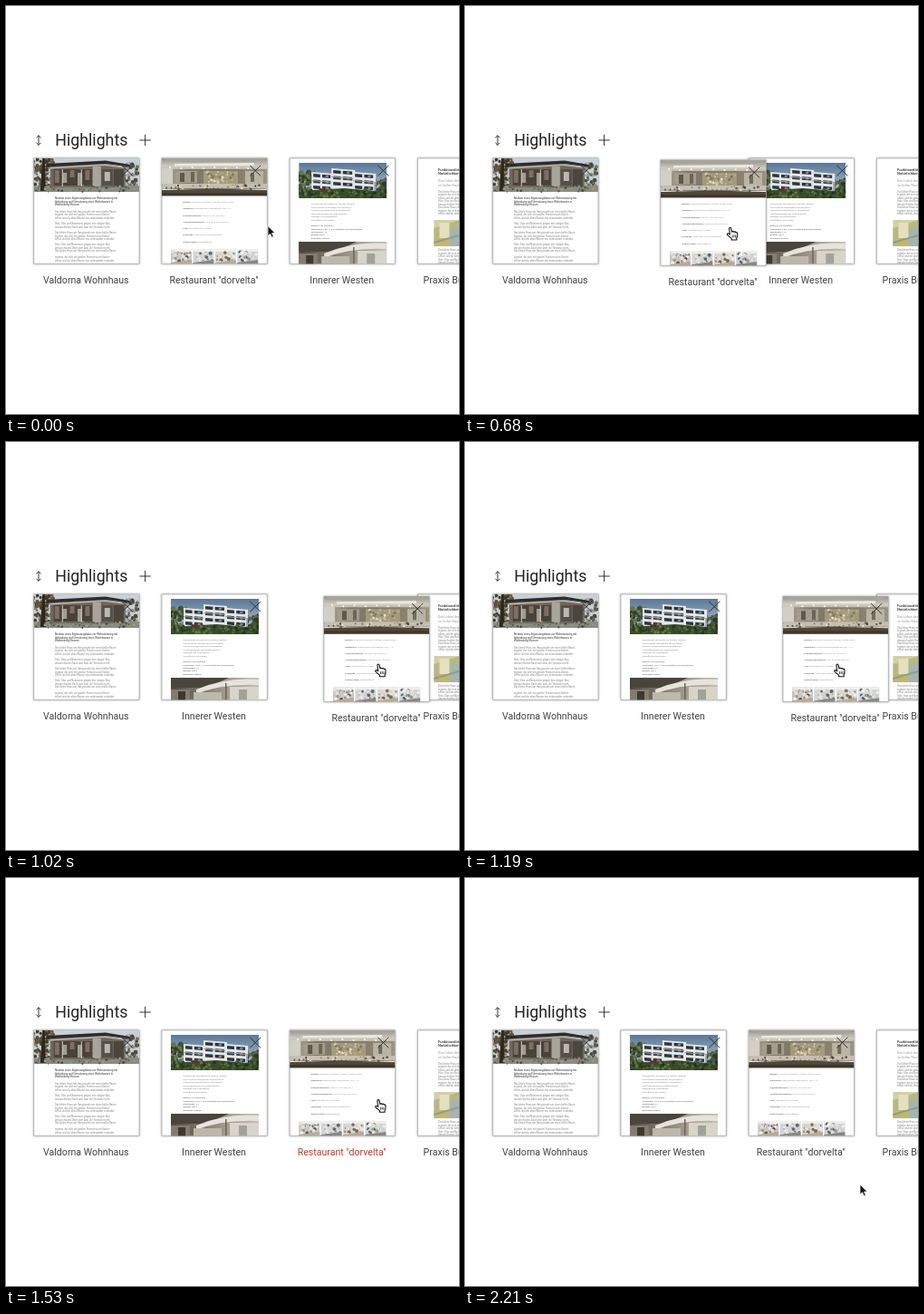
An HTML page for the animation above (2380 ms loop, 500 by 450 pixels).

```html
<!DOCTYPE html>
<html lang="de">
<head>
<meta charset="utf-8">
<title>Highlights</title>
<style>
  html, body { margin: 0; width: 100%; height: 100%; overflow: hidden; background: #fff; }
  svg { display: block; width: 500px; height: 450px; font-family: Roboto, Arial, sans-serif; }
  .paper { fill: #fff; stroke: #b0b0b0; stroke-width: .8; filter: drop-shadow(0 .5px 1px rgba(0,0,0,.4)); }
  .raised .paper { filter: drop-shadow(0 3px 3px rgba(0,0,0,.45)); }
  .label { font-size: 10.6px; fill: #404040; }
  .hot .label { fill: #c2392f; }
  .line { fill: none; stroke: #333; stroke-width: 1; }
</style>
</head>
<body>
<svg viewBox="0 0 500 450">
  <defs>
    <clipPath id="page"><rect width="116.2" height="116.2"/></clipPath>
    <clipPath id="shot"><rect x="10" y="5" width="97" height="39"/></clipPath>
    <linearGradient id="sky" x2="0" y2="1"><stop stop-color="#5b7897"/><stop offset="1" stop-color="#c3d0da"/></linearGradient>
    <linearGradient id="ceiling" x2="0" y2="1"><stop stop-color="#96938b"/><stop offset=".6" stop-color="#cfccc2"/><stop offset="1" stop-color="#aaa596"/></linearGradient>
    <linearGradient id="wall"><stop stop-color="#b3aea2"/><stop offset=".25" stop-color="#7f786a"/><stop offset=".7" stop-color="#857d69"/><stop offset="1" stop-color="#9a9482"/></linearGradient>
    <linearGradient id="room"><stop stop-color="#4e493f"/><stop offset=".5" stop-color="#958c7e"/><stop offset="1" stop-color="#c5c0b5"/></linearGradient>
  </defs>
  <path class="line" d="M36 142.8V153.4M33.4 145.4L36 142.8L38.6 145.4M33.4 150.8L36 153.4L38.6 150.8"/>
  <text x="54.3" y="154.3" font-size="17.75" fill="#222">Highlights</text>
  <path class="line" d="M147.4 148H159.8M153.6 141.8V154.2"/>
  <g id="cards"></g>
  <g id="arrow"><path d="M0 0V11.2L2.6 8.8L4.4 12.7L6.3 11.9L4.6 8.1H8.1Z" fill="#111" stroke="#fff" stroke-width=".8"/></g>
  <g id="hand">
    <path d="M3.4 8L2.6 1.6C2.5 0 4.5 -.2 4.8 1.4L5.6 5.2C6 4.2 7.5 4.2 7.8 5.4C8.3 4.5 9.7 4.7 9.9 5.9C10.5 5.3 11.6 5.6 11.7 6.8C12 9 11.7 10.6 10.8 12V14H5.2V12.4L.7 8.7C-.2 7.6 1.1 6.5 2.1 7.1Z" fill="#fff" stroke="#111" stroke-width="1.1" stroke-linejoin="round"/>
    <path d="M6.2 8.4V11.4M7.9 8.4V11.4M9.5 8.4V11.4" stroke="#111" stroke-width=".7"/>
  </g>
</svg>
<script>
const $ = id => document.getElementById(id);

function rng(seed) {
  return () => (seed = (seed * 16807) % 2147483647) / 2147483647;
}
const box = (x, y, w, h, fill) => `<rect x="${x}" y="${y}" width="${w}" height="${h}" fill="${fill}"/>`;
const shape = (d, fill) => `<path d="${d}" fill="${fill}"/>`;
const type = (x, y, str, size = 2.7, fill = '#777', weight = 400) =>
  `<text x="${x}" y="${y}" font-size="${size}" fill="${fill}" font-weight="${weight}">${str}</text>`;

function leaves(n, x, y, w, h, colors, seed, size = 1.5) {
  const rand = rng(seed * 7919);
  let out = '';
  for (let i = 0; i < n; i++) {
    const cx = x + w * rand(), cy = y + h * rand(), r = size * (.4 + rand());
    out += `<circle cx="${cx.toFixed(1)}" cy="${cy.toFixed(1)}" r="${r.toFixed(1)}" fill="${colors[i % colors.length]}"/>`;
  }
  return out;
}

const filler = [
  'Das kleine Haus am Hang wurde um einen hellen Raum',
  'ergänzt, der sich mit großen Fenstern zum Garten',
  'öffnet und die alten Räume neu miteinander verbindet.',
  'Holz, Glas und Naturstein prägen den ruhigen Bau,',
  'dessen flaches Dach weit über die Terrasse reicht.'
];
const prose = (x, rows, size = 2.75) =>
  rows.map((y, i) => type(x, y, filler[i % filler.length], size, '#808080')).join('');

function housePhoto() {
  let s = box(0, 0, 116.2, 37, '#c6d0d8');
  s += leaves(130, -2, 0, 24, 32, ['#3f3a2c', '#6b5a40', '#51472f', '#8d8068'], 11, 1.7);
  s += leaves(60, 97, 5, 20, 25, ['#4a4838', '#777264', '#5e5a47', '#9aa0a0'], 29, 1.7);
  s += box(0, 30, 116.2, 7, '#8a8c80');
  s += shape('M18 9L78 6L101 10V32H18Z', '#70675c');
  s += box(22, 12, 42, 18, '#48423b');
  for (let i = 0; i < 5; i++) s += box(23 + i * 8.4, 13 + i % 2 * 3, 5, 14 - i % 3 * 3, i % 2 ? '#a39d91' : '#7e6f60');
  s += box(65, 9, 9, 22, '#a9a59c') + box(75, 12, 12, 18, '#54504a') + box(78, 15, 6, 10, '#bcb9ad');
  s += box(88, 12, 11, 19, '#4a453e') + box(31, 12, 1, 19, '#d0ccc2') + box(52, 12, 1, 19, '#d0ccc2');
  s += shape('M14 6L79 2.5L106 7V9.5L79 6L14 9.5Z', '#2e2d2b') + shape('M18 10L78 6.5L101 10V11L78 8L18 11.5Z', '#c0bbb0');
  s += shape('M7 36L9.5 0H12L13 36Z', '#2f281e');
  return s + leaves(70, 0, 30, 116, 7, ['#565e49', '#9b9c8e', '#484b3e', '#787b6c'], 7, 1.1);
}

function diningPhoto() {
  let s = box(0, 0, 116.2, 15, 'url(#ceiling)') + box(0, 12, 116.2, 22, 'url(#wall)');
  s += shape('M0 0H116.2L104 4H14Z', '#a7a49b') + shape('M14 6L102 5V8L14 8.5Z', '#ece9df');
  for (let i = 0; i < 9; i++) s += `<circle cx="${9 + i * 12.3}" cy="${10 + i % 2}" r="1" fill="#fffbe6"/>`;
  s += box(0, 11, 12, 20, '#d3cfc4') + box(15, 14, 24, 13, '#a59d8c') + box(92, 14, 20, 14, '#bab4a4');
  s += box(20, 16, 5, 10, '#5f584c') + box(32, 15, 4, 11, '#6c6557') + box(98, 16, 4, 10, '#716a5d');
  s += box(46, 14, 38, 15, '#a39a7c');
  s += leaves(45, 49, 15, 33, 12, ['#cfc8a2', '#b5ab82', '#e6e0c4', '#7d755b'], 17, 1.2);
  s += box(0, 28, 116.2, 5, '#c4bfb2') + leaves(40, 0, 29, 116, 5, ['#4b443a', '#958c7b', '#dcd7ca', '#6a6253'], 23, 1.1);
  return s + shape('M0 35L58 33.5L116.2 35V41.3H0Z', '#51483b') + box(0, 38, 116.2, 3.3, '#3f372c');
}

function villaPhoto() {
  let s = box(10, 5, 97, 39, 'url(#sky)');
  s += leaves(80, 8, 15, 20, 24, ['#2c3c26', '#435532', '#66754d'], 41, 2);
  s += leaves(40, 92, 23, 16, 15, ['#2d3a28', '#465638', '#5c6b4a'], 61, 2);
  // Stepped blocks: each is white slabs over dark glazing, falling to the right
  [[24, 15, 24], [46, 11, 26], [70, 15, 25]].forEach(([x, y, w]) => {
    s += shape(`M${x} ${y}L${x + w} ${y + 2}V37H${x}Z`, '#e4e7e8');
    for (let i = 0; i < 3; i++) {
      const top = y + 2 + i * 6.5;
      s += shape(`M${x + 2} ${top}L${x + w - 3} ${top + 1.6}V${top + 5}L${x + 2} ${top + 3.6}Z`, '#30363c');
      s += box(x + w * .4, top, 2.2, 6, '#e4e7e8') + box(x + w * .65, top + 1.6, 3, 2.4, '#7c868d');
    }
    s += shape(`M${x} ${y + 9}L${x + w} ${y + 11}V37H${x + w - 2}V${y + 12}L${x} ${y + 10}Z`, '#9fa6a9');
  });
  s += shape('M10 36L60 33L107 37V44H10Z', '#3a4c2b');
  s += leaves(110, 10, 34, 97, 9, ['#24331f', '#455e33', '#5f7748', '#304024'], 83, 1.5);
  s += leaves(7, 34, 31, 10, 6, ['#7d2f33'], 5, 1);
  return `<g clip-path="url(#shot)">${s}</g>`;
}

function roomPhoto() {
  let s = box(10, 92, 97, 25, 'url(#room)');
  s += shape('M10 92H74L49 103H10Z', '#4a453c') + shape('M38 105Q70 91 107 94V100Q67 98 38 110Z', '#e6e3dc');
  s += box(10, 105, 21, 12, '#857c6e') + box(35, 108, 31, 9, '#bdb8ac') + box(75, 102, 32, 15, '#d8d4c9');
  return s + box(70, 98, 1.5, 19, '#6b6459') + box(85, 105, 9, 12, '#a1a39b') + box(18, 107, 8, 10, '#3d3932');
}

function thumb(i) {
  const x = 10 + i * 24.4;
  const wall = ['#c9c6c0', '#d3d4d5', '#d8d6ce', '#cbd2d6'][i];
  const dark = ['#5a5550', '#5c6672', '#7c6b5c', '#566069'][i];
  return box(x, 100, 23, 17, wall) + box(x, 100, 23, 3, '#efeeeb') +
    leaves(26, x + 1.5, 103, 20, 13, [dark, '#f1f0ed', '#9c9790', '#e3e1db'], 31 + i, 1.5) +
    shape(`M${x} 115L${x + 23} 112V117H${x}Z`, i % 2 ? '#8a8681' : '#b7aa9a');
}

function housePage() {
  return housePhoto() +
    ['Neubau eines Ergänzungsbaus zur Wohnnutzung mit', 'Anbindung und Umnutzung eines Wohnhauses in', 'Waldenberg/Hessen']
      .map((s, i) => type(23.2, 45 + i * 3.7, s, 2.95, '#555', 500)).join('') +
    prose(23.2, [59.5, 63, 66.5, 73, 76.5, 83, 86.5, 90, 96, 99.5, 103, 110, 113.5]);
}

function diningPage() {
  const facts = [
    ['Bauherr:', 'Nordlicht Gastraum, Altstadt, Untere Gasse'],
    ['Objektform:', 'Gastronomie Innenausbau, LPH 1–9'],
    ['Planungszeitraum:', 'Mai 2011 bis Juni 2012'],
    ['Ausführungszeitraum:', 'April 2012 bis Juli 2012'],
    ['Lage:', 'Dachgeschoss Altstadt'],
    ['Fotografie:', 'Innenraum und Dachterrasse'],
    ['Weitere Daten:', 'Gesamtfläche']
  ];
  return diningPhoto() + facts.map(([k, v], i) =>
    type(23.3, 49.1 + i * 7.25, `<tspan font-weight="500" fill="#555">${k}</tspan> ${v}`, 2.45, '#8a8a8a')).join('') +
    [0, 1, 2, 3].map(thumb).join('');
}

function villaPage() {
  const top = ['Wohnanlage mit Gärten im Westen, Neubau', 'und moderne Stadthäuser mit Terrassen',
    'Planung und Bauleitung im Stadtgebiet', 'Leistungsphasen der Objektplanung', 'Gebäude und Innenräume', 'Wohnfläche und Garten'];
  const facts = ['Bauherr: HR Wohnbau', 'Leistungen: LPH 1–8 Architektur und Innenausbau',
    'Wohnungen: 12', 'Bauzeit: 2012', 'Bauweise: massiv'];
  return villaPhoto() + top.map((s, i) => type(23.5, 51 + i * 3.55, s, 2.5)).join('') +
    facts.map((s, i) => type(23.5, 75.3 + i * 3.3, s, 2.5, '#666', 500)).join('') + roomPhoto();
}

function praxisPage() {
  let s = type(22.7, 13.6, 'Funktionalität', 4.1, '#444', 700) + type(22.7, 18.2, 'Natürlichkeit und', 4.1, '#444', 700);
  s += type(22.7, 26.3, 'Das Leben der Menschen', 3.6, '#999') + type(22.7, 30.5, 'im hellen Raum', 3.6, '#999');
  s += prose(22.7, [37.5, 41, 44.5, 48, 51.5, 55, 58.5, 62]);
  s += box(18, 68, 80, 29, '#d3cfa4') + shape('M18 77L46 68V97H18Z', '#b7b884');
  s += box(24, 71, 11, 17, '#e4e0c0') + box(36, 77, 10, 20, '#a4b5b2') + box(20, 88, 14, 7, '#c4b567');
  s += shape('M18 92L46 84V86L18 94Z', '#8d9b91');
  return s + prose(22.7, [102, 105.5, 109, 112.5, 116]);
}

const slot = i => 30.8 + i * 141.2;
const pages = [
  ['Valdorna Wohnhaus', housePage()],
  ['Innerer Westen', villaPage()],
  ['Praxis Bunthalden', praxisPage()],
  ['Restaurant "dorvelta"', diningPage()]
];
$('cards').innerHTML = pages.map(([name, art], i) => `<g id="card${i}">
  <rect class="paper" width="116.2" height="116.2"/>
  <g clip-path="url(#page)">${art}</g>
  <path class="line" d="M97.2 7.8L109.2 19.4M109.2 7.8L97.2 19.4"/>
  <text class="label" ${i === 2 ? 'x="6.2"' : 'x="57.5" text-anchor="middle"'} y="137.6">${name}</text></g>`).join('');

const place = (id, x, y) => $(id).setAttribute('transform', `translate(${x} ${y})`);
place('card0', slot(0), 168);
place('card2', slot(3), 168);

// Pose per tick: card x, card lift, pointer x, pointer y
const TICK = 170;
const poses = [
  [slot(1), 0, 289, 242.5], [slot(1), 0, 258, 242], [slot(1), 0, 234, 242], [slot(1), 0, 231, 242],
  [216, 2, 289, 244], [303, 2.3, 375.3, 244.7], [351, 2.3, 407.3, 244.7], [351, 2.3, 407.3, 244.7],
  [322, 0, 407.3, 244.3], [slot(2), 0, 407.3, 244.3], [slot(2), 0, 408, 246],
  [slot(2), 0, 436, 338], [slot(2), 0, 436, 338], [slot(2), 0, 436, 338]
];

function render(ms) {
  const n = Math.floor(ms / TICK) % poses.length;
  const [x, lift, px, py] = poses[n];
  const over = n > 0 && n < 11;
  const dragging = n >= 4 && n <= 7;
  place('card1', slot(n < 6 ? 2 : 1), 168);
  place('card3', x, 168 + lift);
  $('card3').setAttribute('class', (over && !dragging ? 'hot ' : '') + (n > 0 && n < 4 ? 'raised' : ''));
  $('arrow').style.display = over ? 'none' : '';
  $('hand').style.display = over ? '' : 'none';
  place(over ? 'hand' : 'arrow', px, py);
}

const start = performance.now();
function frame() {
  render(performance.now() - start);
  requestAnimationFrame(frame);
}
frame();
</script>
</body>
</html>
```
